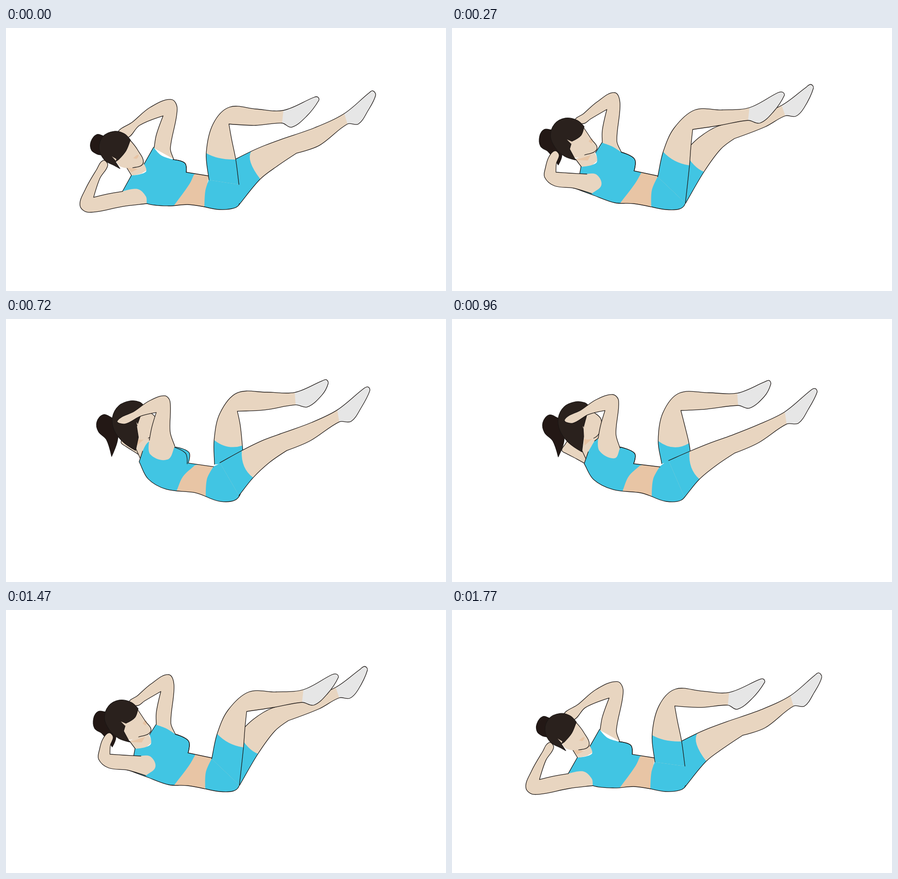
Recreate the animation shown at these times as an HTML page with a canvas. Size 969 px wide and 578 px high, loop 1.8 s.

```html
<!DOCTYPE html>
<html lang="en">
<head>
<meta charset="utf-8">
<title>Bicycle crunch</title>
<style>
html, body { margin: 0; width: 100%; height: 100%; overflow: hidden; background: #fff; }
canvas { display: block; }
</style>
</head>
<body>
<canvas id="stage" width="969" height="578"></canvas>
<script>
const ctx = document.getElementById("stage").getContext("2d");
const SKIN = "#e8d5c0", SHADE = "#e8c5a5", BLUE = "#41c5e3", SOCK = "#e6e6e6",
  HAIR = "#2a211d", BUN = "#231815", INK = "#1c1715";
const LOOP = 1800, STEP = 30;

// Each part: sharp corner indices, then its outline in four key poses.
const part = (corners, ...poses) => ({
  corners,
  poses: poses.map(s => s.split(" ").map(p => p.split(",").map(Number)))
});
const KEYS = [0.003, 0.25, 0.655, 0.976];

// Legs: groin, thigh, knee, shin, ankle, toes, heel, calf, knee, thigh, seat; the last point bends the hem.
const parts = {
  farLeg: part([13],
    "490,296 540,271 570,258 605,245 680,219 745,188 799,143 808,138 814,148 797,182 776,211 752,211 690,258 640,275 598,303 560,332 512,390 539,296",
    "490,300 512,272 545,240 585,216 655,198 726,170 779,131 790,124 796,132 775,176 757,194 734,193 690,217 622,243 592,266 555,316 514,386 533,301",
    "462,318 481,263 507,216 550,174 615,166 680,157 737,127 747,124 752,133 736,162 712,184 684,184 630,203 555,214 548,240 527,300 516,380 502,284",
    "462,318 454,268 464,207 500,163 565,162 628,163 689,138 698,135 702,143 688,170 655,196 630,190 560,198 504,201 512,232 522,273 526,300 488,282"),
  nearLeg: part([13],
    "447,334 441,275 456,211 492,174 550,178 611,181 679,152 687,152 689,159 662,194 629,218 608,209 550,214 491,211 497,245 506,289 513,344 470,286",
    "453,327 465,272 489,220 535,180 595,180 655,175 718,142 728,141 732,148 708,184 678,209 652,203 590,214 530,223 526,262 523,302 514,385 491,292",
    "452,330 497,279 540,239 592,212 650,202 705,181 766,139 776,136 780,144 760,182 735,209 708,206 640,240 588,256 563,286 539,328 516,384 511,309",
    "477,311 523,291 570,272 615,256 675,232 733,204 791,156 800,153 804,161 785,198 763,229 737,231 675,272 622,295 583,321 545,352 512,392 527,326"),
  hips: part([0, 2],
    "447,333 439,358 437,393 470,399 502,396 514,386 513,340",
    "453,327 440,357 439,393 470,399 500,398 513,387 516,340",
    "455,324 441,352 440,391 470,400 502,398 517,382 520,345",
    "458,324 443,352 440,390 472,401 505,398 517,377 500,290"),
  torso: part([0, 2, 3, 5, 7, 8, 9],
    "276,324 308,316 304,299 325,262 342,280 368,289 394,297 397,317 446,325 437,393 400,388 358,391 311,386 256,360",
    "284,305 318,296 316,274 330,252 352,260 373,273 402,288 401,314 453,325 438,393 400,386 358,384 310,367 275,354",
    "299,288 315,272 325,265 335,263 350,264 365,273 405,284 405,312 455,324 440,391 410,381 350,374 315,350 296,315",
    "300,292 308,278 314,268 322,262 345,272 368,281 402,295 400,318 458,325 440,390 415,382 355,375 312,353 291,318"),
  bust: part([0, 2],
    "368,289 394,297 397,317", "373,273 402,288 401,314",
    "335,265 380,288 398,317", "368,281 402,295 400,318"),
  waist: part([],
    "414,322 404,343 370,390", "417,318 403,342 371,384",
    "420,319 395,346 375,377", "414,322 389,346 376,377"),
  neck: part([0, 1, 2, 3],
    "277,325 264,304 302,290 311,312 298,320", "287,308 272,288 310,265 322,290 305,305",
    "296,302 281,270 300,240 335,265 312,295", "297,312 284,284 300,230 325,262 312,285"),
  neckShade: part([0, 1, 2],
    "266,306 290,310 276,317", "273,290 306,279 299,291",
    "280,264 290,270 285,280", "290,255 322,252 292,278"),
  face: part([0],
    "273,246 290,268 302,297 279,307 250,303 235,275", "290,219 306,243 319,266 292,279 264,283 250,245",
    "306,196 326,212 333,247 312,262 283,268 270,230", "310,204 328,220 326,247 312,262 288,262 270,230"),
  nose: part([],
    "280,286 288,287 291,279", "301,249 308,253 308,243",
    "326,222 327,224 327,220", "326,230 327,232 327,228"),
  hair: part([0, 7, 8, 9],
    "274,246 260,232 238,227 214,238 205,264 217,290 240,303 251,309 241,294 248,289 264,270",
    "291,217 276,203 250,198 226,211 217,238 228,264 248,282 272,290 259,266 264,249 284,236",
    "309,194 297,181 274,176 247,187 232,214 238,244 258,266 283,279 288,262 280,225 298,206",
    "302,192 292,184 272,182 247,193 234,218 238,246 257,272 286,292 290,258 289,240 296,214"),
  strand: part([0, 1, 2],
    "233,282 243,288 242,292", "253,245 265,250 263,255",
    "278,206 288,216 284,217", "288,235 290,238 289,241"),
  tail: part([5],
    "216,238 200,234 187,250 188,268 200,277 208,279 213,279 216,272",
    "220,224 203,223 193,238 195,260 212,272 234,301 242,280 235,262",
    "232,217 213,210 199,224 201,244 218,259 234,303 245,272 246,248",
    "234,218 214,211 200,228 204,250 222,268 234,303 246,272 246,250"),
  farArm: part([9],
    "369,288 362,264 377,178 364,157 318,174 278,207 245,232 268,241 294,214 346,193 331,235 326,264",
    "373,273 363,248 370,165 358,142 320,162 290,188 270,205 290,210 305,200 341,179 331,225 331,255",
    "364,273 347,250 328,205 314,187 302,190 290,198 275,215 285,225 300,225 312,220 325,240 334,262",
    "300,322 275,308 252,296 242,290 243,284 248,277 255,268 262,268 268,275 272,280 285,290 296,300"),
  nearArm: part([9, 11],
    "310,386 258,392 182,405 163,390 175,354 199,312 214,291 224,302 207,330 193,372 222,365 257,359 290,354 308,370",
    "308,364 268,352 226,347 204,328 206,306 213,284 226,270 236,279 230,297 229,317 260,319 297,321 318,322 329,345",
    "356,292 335,264 312,226 298,215 280,219 258,231 234,241 247,246 270,243 290,242 294,262 301,288 305,318 345,323",
    "370,284 361,252 367,180 354,166 318,177 284,200 248,221 266,229 300,210 337,201 327,235 322,262 325,290 358,306")
};

// Cubic blend of the key poses at swing position u.
function pose({ corners, poses }, u) {
  const w = KEYS.map((k, i) => KEYS.reduce((m, q, j) => i === j ? m : m * (u - q) / (k - q), 1));
  const pts = poses[0].map((_, n) =>
    [0, 1].map(axis => poses.reduce((sum, p, i) => sum + w[i] * p[n][axis], 0)));
  pts.corners = corners;
  return pts;
}

// Handle of a smooth curve at point i, a third of the segment long.
function handle(p, i, length) {
  if (p.corners.includes(i)) return p[i];
  const a = p[Math.max(i - 1, 0)], b = p[Math.min(i + 1, p.length - 1)];
  const dx = b[0] - a[0], dy = b[1] - a[1], k = length / 3 / (Math.hypot(dx, dy) || 1);
  return [p[i][0] + dx * k, p[i][1] + dy * k];
}

function curve(p, from = 0, to = p.length - 1, join = false) {
  join ? ctx.lineTo(...p[from]) : ctx.moveTo(...p[from]);
  for (let i = from; i < to; i++) {
    const d = Math.hypot(p[i + 1][0] - p[i][0], p[i + 1][1] - p[i][1]);
    ctx.bezierCurveTo(...handle(p, i, d), ...handle(p, i + 1, -d), ...p[i + 1]);
  }
}

function fill(color, p, from, to) {
  ctx.beginPath();
  curve(p, from, to);
  ctx.fillStyle = color;
  ctx.fill();
}

function line(p, from, to) {
  ctx.beginPath();
  curve(p, from, to);
  ctx.stroke();
}

// Fills a part together with the curve back to its first point.
function blob(color, p) {
  const ring = [...p, p[0]];
  ring.corners = p.corners;
  fill(color, ring);
  return ring;
}

function leg(all) {
  const hem = all[17], p = all.slice(0, 17);
  p.corners = all.corners;
  fill(SKIN, p);
  fill(SOCK, p, 5, 11);
  ctx.beginPath();
  curve(p, 15, 16);
  curve(p, 0, 1, true);
  const bend = hem.map((v, i) => 2 * v - (p[1][i] + p[15][i]) / 2);
  ctx.quadraticCurveTo(...bend, ...p[15]);
  ctx.fillStyle = BLUE;
  ctx.fill();
  line(p);
}

function body({ torso, waist, hips, bust }) {
  fill(BLUE, torso);
  ctx.save();
  ctx.beginPath();
  curve(torso);
  ctx.clip();
  ctx.beginPath();
  curve(waist);
  [[375, 400], [445, 410], [470, 310]].forEach(p => ctx.lineTo(...p));
  ctx.fillStyle = SHADE;
  ctx.fill();
  ctx.restore();
  fill(BLUE, hips);
  line(torso, 2, 3);
  line(torso, 5, 8);
  ctx.beginPath();
  curve(torso, 9, 13);
  ctx.lineTo(...torso[0]);
  ctx.stroke();
  line(bust);
  line(hips, 2, 5);
}

function head({ face, nose, hair, strand }) {
  fill(SKIN, face);
  blob(SHADE, nose);
  line(face, 0, 3);
  line(blob(HAIR, hair));
  fill(SKIN, strand);
}

function draw(now) {
  const t = Math.floor(now / STEP) * STEP % LOOP;
  const u = (1 - Math.cos(2 * Math.PI * (t + STEP) / LOOP)) / 2;
  const now3 = {};
  for (const name in parts) now3[name] = pose(parts[name], u);
  const { farArm, nearArm, farLeg, nearLeg, neck, neckShade, tail } = now3;

  ctx.fillStyle = "#fff";
  ctx.fillRect(0, 0, 969, 578);
  ctx.strokeStyle = INK;
  ctx.lineWidth = 1.3;
  ctx.lineJoin = ctx.lineCap = "round";

  fill(SKIN, farArm);
  line(farArm);
  leg(farLeg);
  line(blob(BUN, tail));
  fill(SKIN, neck);
  fill(SHADE, neckShade);
  line(neck, 0, 1);
  body(now3);
  leg(nearLeg);
  head(now3);
  blob(SKIN, nearArm);
  line(nearArm, 0, 11);
}

const start = performance.now();
function tick() {
  draw(performance.now() - start);
  requestAnimationFrame(tick);
}
tick();
</script>
</body>
</html>
```
